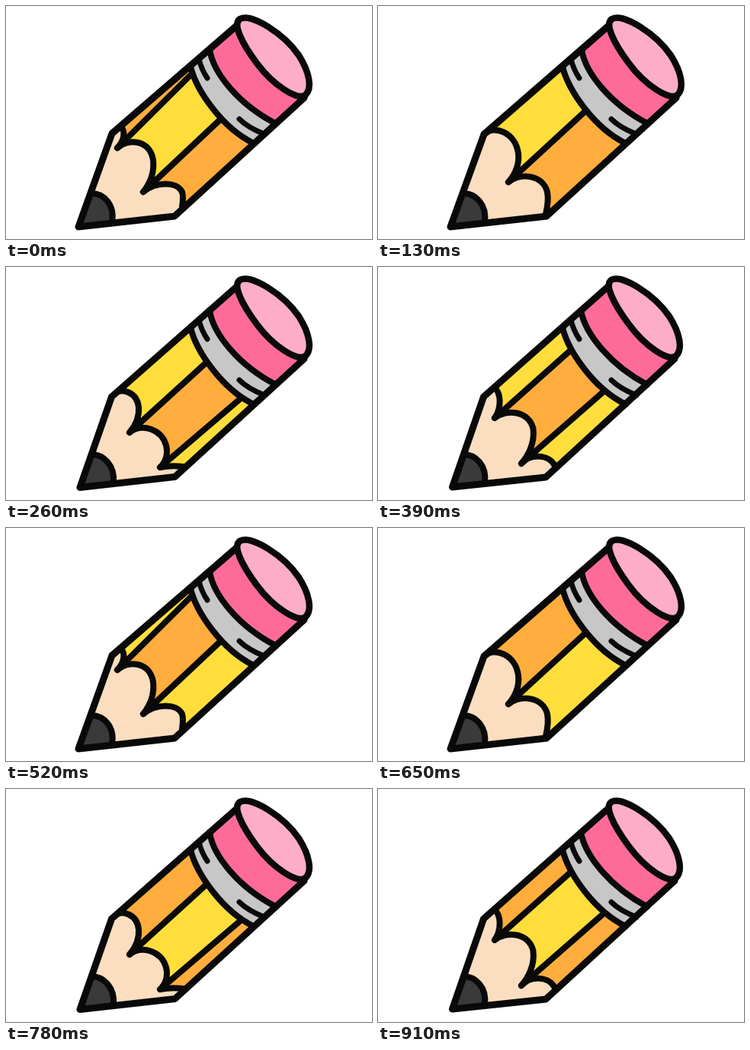
These frames come from a looping animation (480x307 px, 1.04 s). An HTML page:

```html
<!DOCTYPE html>
<html lang="en">
<head>
<meta charset="utf-8">
<title>Rolling pencil</title>
<style>
  html, body { margin: 0; width: 100%; height: 100%; overflow: hidden; background: #fff; }
  svg { display: block; width: 100vw; height: 100vh; }
  .ink { fill: none; stroke: #090909; stroke-linecap: round; stroke-linejoin: round; }
</style>
</head>
<body>
<svg viewBox="0 0 480 307" xmlns="http://www.w3.org/2000/svg">
  <defs><clipPath id="shell"><path id="shellShape"/></clipPath></defs>
  <g id="pencil"></g>
</svg>
<script>
const STEP = 130, STEPS = 8;
const YELLOW = '#ffde3b', ORANGE = '#ffad3d', WOOD = '#fbdec0';
const PINK = '#ff6b99', LIGHT = '#fdadc8', GREY = '#c7c7c7', LEAD = '#3a3a3a';

// Four poses of a quarter turn; edges run from the ferrule to a scallop cusp.
const poses = [
  { tip: [95, 291], left: [139, 168], right: [221, 277], dx: 0, lead: [139, 285],
    edges: [[240, 92, 146, 187], [279, 151, 180, 245]],
    wood: 'M151 159C157 166 155 177 146 187C160 174 189 176 193 203C195 221 187 236 180 245C195 232 224 230 231 245C233 252 232 258 231 264' },
  { tip: [95, 291], left: [139, 169], right: [221, 277], dx: 0, lead: [140, 285],
    edges: [[269, 141, 171, 232]],
    wood: 'M141 168C152 157 180 166 184 194C186 212 177 225 171 232C189 218 217 224 222 245C224 256 222 266 220 274' },
  { tip: [97, 290.5], left: [138.5, 171], right: [221.5, 276.5], dx: 0, lead: [141, 284],
    edges: [[258, 130, 162, 218], [305, 176, 202, 264]],
    wood: 'M141 168C152 158 172 165 174 185C175 200 168 211 162 218C179 205 204 214 210 235C213 248 209 257 202 264C212 262 224 262 232 263' },
  { tip: [97.5, 290], left: [138.5, 171], right: [220, 277], dx: -2, lead: [140, 284],
    edges: [[250, 112, 153, 199], [294, 166, 188, 259]],
    wood: 'M152 158C162 166 162 186 153 199C169 186 198 190 203.5 213C206 233 196 250 188 259C199 246 224 246 232 262' }
];

const fill = (d, color) => `<path d="${d}" fill="${color}"/>`;
const ink = (d, width = 8) => `<path class="ink" d="${d}" stroke-width="${width}"/>`;

// Each edge starts a little way under the ferrule.
const edgeLine = ([x, y, cx, cy]) => `M${x + 10} ${y - 9}L${cx} ${cy}`;

// Everything on the upper-left side of an edge.
const aboveEdge = e => `${edgeLine(e)}l-70 -75L${e[0] - 60} ${e[1] - 84}Z`;

function draw(step) {
  const { tip, left, right, dx, lead, edges, wood } = poses[step % 4];
  const colors = step < 4 ? [ORANGE, YELLOW] : [YELLOW, ORANGE];
  // One facet rolls out of sight after the first pose.
  const hidden = step % 4 ? 1 : 0;
  const facet = i => colors[(i + hidden) % 2];

  const body = `M${left}L${303 + dx / 2} 25.5L${391 + dx} 121L${right}L${tip}Z`;
  const collar = `M${267 + dx / 2} 57C271.5 88 305 129.5 ${354 + dx / 2} 155`;
  const ferrule = 'M242 80C250 112 284 161 325 181';
  const leadArc = `M111 247C128 246 143 262 ${lead}`;
  const cap = `M${307 + dx / 2} 17C${322 + dx} 9 ${365 + dx} 37 ${384 + dx} 65` +
    `C${398 + dx} 87 ${402 + dx} 108 ${393 + dx} 117C${383 + dx} 126 350 104 329 75.5` +
    `C308 47 297 23 ${307 + dx / 2} 17Z`;

  const bands = edges.map((e, i) => fill(aboveEdge(e), facet(i))).reverse().join('');

  document.getElementById('shellShape').setAttribute('d', body);
  document.getElementById('pencil').innerHTML =
    '<g clip-path="url(#shell)">' +
      fill(body, facet(edges.length)) + bands +
      fill(`${wood}L${right}L${tip}L${left}Z`, WOOD) +
      fill(`${leadArc}L${tip}Z`, LEAD) +
      edges.map(e => ink(edgeLine(e))).join('') +
      ink(wood) + ink(leadArc) +
      fill(`${ferrule}L410 110L303 10Z`, GREY) +
      fill(`${collar}L410 110L303 10Z`, PINK) +
    '</g>' +
    ink(ferrule) + ink(collar) +
    ink('M253 70C256 82 260 89 264 95', 7) +
    ink('M306 149C312 155 322 162 339 169', 7) +
    ink(body, 9) + fill(cap, LIGHT) + ink(cap, 8.5);
}

let shown = -1;
const start = performance.now();
function tick(now) {
  const step = Math.floor(Math.max(0, now - start) / STEP) % STEPS;
  if (step !== shown) draw(shown = step);
  requestAnimationFrame(tick);
}
tick(start);
</script>
</body>
</html>
```
